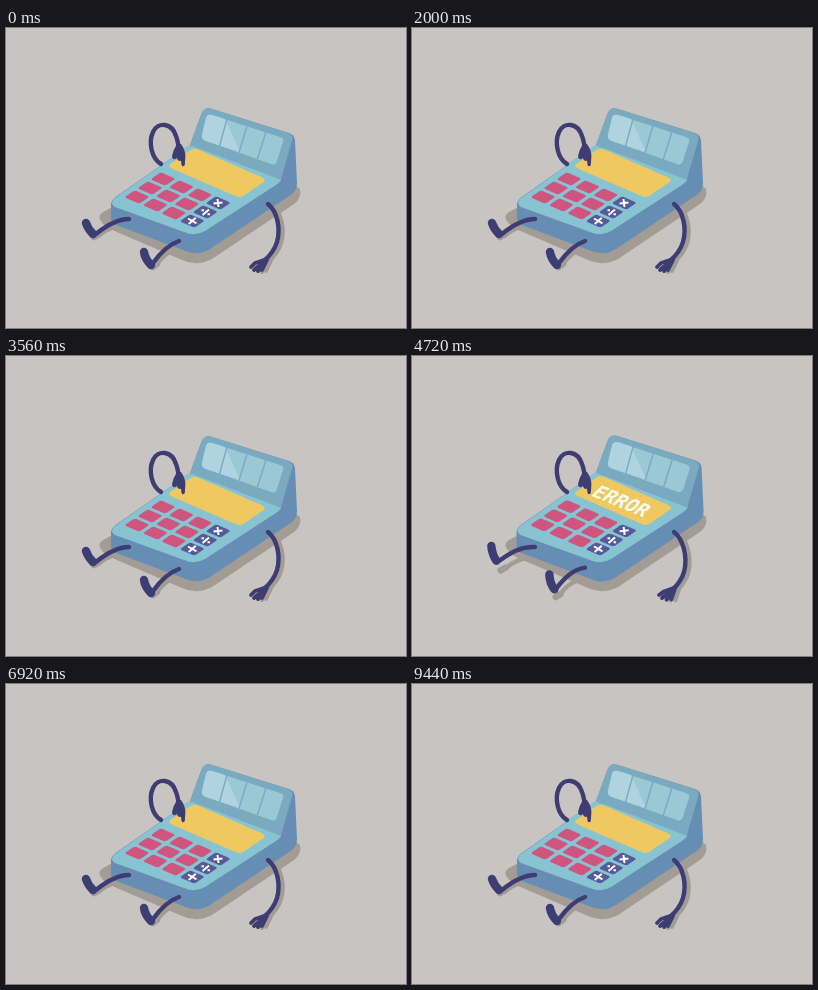
These frames come from a looping animation (400 px wide and 300 px high, 9.48 s). An HTML page:

```html
<!DOCTYPE html>
<html lang="en">
<head>
<meta charset="utf-8">
<title>Calculator error</title>
<style>
html, body { margin: 0; width: 100%; height: 100%; overflow: hidden; background: #c8c4c1; }
svg { display: block; width: 100%; height: 100%; }
.limb { fill: none; stroke: #3d3c73; stroke-width: 4.4; stroke-linecap: round; stroke-linejoin: round; }
.shoe { stroke-width: 8.4; }
.sole { stroke-width: 6.5; }
.finger { stroke-width: 3.8; }
.shade { fill: #a29c94; }
.shade .limb { stroke: #a29c94; }
.sign { fill: none; stroke: #fff; stroke-width: 2; }
</style>
</head>
<body>
<svg viewBox="0 0 400 300">
  <rect width="400" height="300" fill="#c8c4c1"/>
  <g class="shade">
    <path d="M112 176L97 184Q91 188 95 193Q97 197 104 201L176 232Q191 239 206 231L288 176Q296 170 294 161L280 150Z"/>
    <g id="shadeL"></g>
    <g id="shadeR"></g>
    <g id="shadeArm" transform="translate(4 1)"></g>
  </g>
  <g id="body">
    <path fill="#668db4" d="M105 178Q104 173 111 168L184 117L195 87Q198 78 206 81L283 105Q289 107 289 113L291 155Q291 162 286 166L204 221Q191 229 177 222L110 197Q105 195 105 190Z"/>
    <path fill="#88c3d2" d="M109 170L184 117L275 150Q276 153 270 157L199 203Q189 209 178 204L109 179Q103 175 109 170Z"/>
    <path fill="#79aabf" d="M184 117L195 87Q198 78 206 81L282 105Q288 107 286 113L275 151Q274 152 270 150Z"/>
    <path fill="#9bc8d5" d="M200 90Q201 86 206 87L274 109Q278 110 277 114L271 133Q269 138 265 136L200 113Q195 111 196 107Z"/>
    <path fill="#afd4df" d="M200 90Q201 86 206 87L219 91L234 124L200 113Q195 111 196 107Z"/>
    <path fill="none" stroke="#79aabf" stroke-width="1.4" d="M221 91L213.500 118M241 98L233 124.500M260 104L251 132"/>
    <g transform="matrix(1.84 .8 -1.3 .9 157 151)">
      <rect x="-4.800" y="-30.500" width="39.800" height="20.700" rx="2.6" fill="#efc95f"/>
      <g id="keys"></g>
    </g>
    <path class="sign" d="M207.500 175.500L216.500 174.500M211.500 171L212.500 179"/>
    <path class="sign" d="M196.500 187L203 181.500M195.500 182.300H198M201.500 186.300H204"/>
    <path class="sign" d="M182 190.500L190.500 195.300M189.800 189.800L182.700 196"/>
    <text id="error" text-anchor="middle" y="6.900" font-family="'DejaVu Sans Mono', monospace" font-weight="bold" font-size="19" fill="#fffdf2">ERROR</text>
  </g>
  <g id="legL"></g>
  <g id="legR"></g>
  <g id="armR"></g>
  <g id="armL"></g>
</svg>
<script>
const NS = 'http://www.w3.org/2000/svg';
const CYCLE = 1896;
const $ = id => document.getElementById(id);

function add(parent, tag, attrs) {
  const el = document.createElementNS(NS, tag);
  for (const k in attrs) el.setAttribute(k, attrs[k]);
  return parent.appendChild(el);
}

// Each part: class, resting path, active path
const limbs = {
  legL: [
    ['limb', 'M123 191C111 191 101 197 90 206', 'M123 191C108 190 98 196 86 204'],
    ['limb shoe', 'M80 195Q82 201 87 206', 'M79 187.5Q79 197 83 204']
  ],
  legR: [
    ['limb', 'M173 213C164 216 155 224 147 235', 'M173 211C160 212 152 220 143 231'],
    ['limb shoe', 'M138 224Q139 231 145 237', 'M137 215.5Q137 225 141 231.5']
  ],
  shadeL: [
    ['limb', 'M123 197C110 197 100 201 92 208', 'M123 203C110 203 102 208 94 215'],
    ['limb sole', 'M88 209L93 206', 'M89 217L94 214.5']
  ],
  shadeR: [
    ['limb', 'M172 220C163 222 156 229 150 237', 'M172 224C160 226 152 232 147 239'],
    ['limb sole', 'M147 239L151 236', 'M142 242L147 239.5']
  ],
  armR: [
    ['limb', 'M262 176C271 183 275 200 271 214Q268 224 258 233', 'M262 176C271 183 276 200 273 215Q271 225 261 235'],
    ['limb finger',
      'M261 231L249 235L245 239M260 232L248 242M259 234L252 243M261 232L256 242',
      'M264 232L253 236L248 239M262 234L251 242M261 235L256 244M264 233L261 244']
  ],
  armL: [
    ['limb', 'M155 136C146 131 142 115 147 104C152 93 166 95 170 108Q172 113 173 122', 'M155 137C146 132 142 121 147 112C152 101 163 103 167 116Q170 126 172 135']
  ]
};

const blend = (a, b, k) => {
  const to = b.match(/[\d.]+/g);
  let i = 0;
  return a.replace(/[\d.]+/g, n => (+n + (to[i++] - n) * k).toFixed(2));
};
const build = (id, name = id) => limbs[name].map(([cls, rest, up]) => ({ el: add($(id), 'path', { class: cls }), rest, up }));
const pose = (parts, k) => parts.forEach(p => p.el.setAttribute('d', blend(p.rest, p.up, k)));

const lifted = ['legL', 'legR', 'shadeL', 'shadeR', 'armR'].flatMap(n => build(n)).concat(build('shadeArm', 'armR'));
const armL = build('armL');
const hand = add($('armL'), 'path', {
  fill: '#3d3c73',
  d: 'M171 116Q167 122 166 128Q166.500 132 169.500 131L171 130Q171.500 133 174 133L175 132.500L175.500 137Q177 139.500 178.800 137L179.300 130Q180 123 175 116Z'
});

const addKey = (c, r, fill) => add($('keys'), 'rect', {
  x: c * 10 - 4, y: r * 10 - 4, width: 8, height: 8, rx: 1.5, fill
});
for (let r = 0; r < 3; r++) {
  for (let c = 0; c < 4; c++) addKey(c, r, c === 3 ? '#555a98' : '#cf557f');
}
const pressed = addKey(1, 0, '#a02a55');

const clamp = x => Math.min(1, Math.max(0, x));
const easeInOut = x => x < .5 ? 2 * x * x : 1 - 2 * (1 - x) * (1 - x);
const easeOut = x => 1 - (1 - x) * (1 - x);
const ramp = (t, from, to, ease = easeInOut) => ease(clamp((t - from) / (to - from)));
const pulse = (t, a, b, c, d) => ramp(t, a, b) - ramp(t, c, d);

function draw(time) {
  const t = time % CYCLE;
  const press = pulse(t, 110, 380, 620, 900);
  const puff = pulse(t, 250, 430, 910, 1075);

  pose(armL, press);
  hand.setAttribute('transform', `translate(${-1.5 * press} ${14.5 * press})`);
  pose(lifted, pulse(t, 280, 560, 720, 1230));

  const size = 1 + .006 * puff;
  $('body').setAttribute('transform', `translate(190 200) scale(${size}) translate(-190 -200)`);
  pressed.setAttribute('opacity', pulse(t, 340, 410, 480, 640));

  const s = .6 + .4 * ramp(t, 350, 895, easeOut);
  $('error').setAttribute('visibility', t >= 350 && t < 1080 ? 'visible' : 'hidden');
  $('error').setAttribute('transform', `translate(209.500 145.200) matrix(.92 .38 -.755 .755 0 0) scale(${s})`);
}

function tick() {
  draw(performance.now());
  requestAnimationFrame(tick);
}
tick();
</script>
</body>
</html>
```
